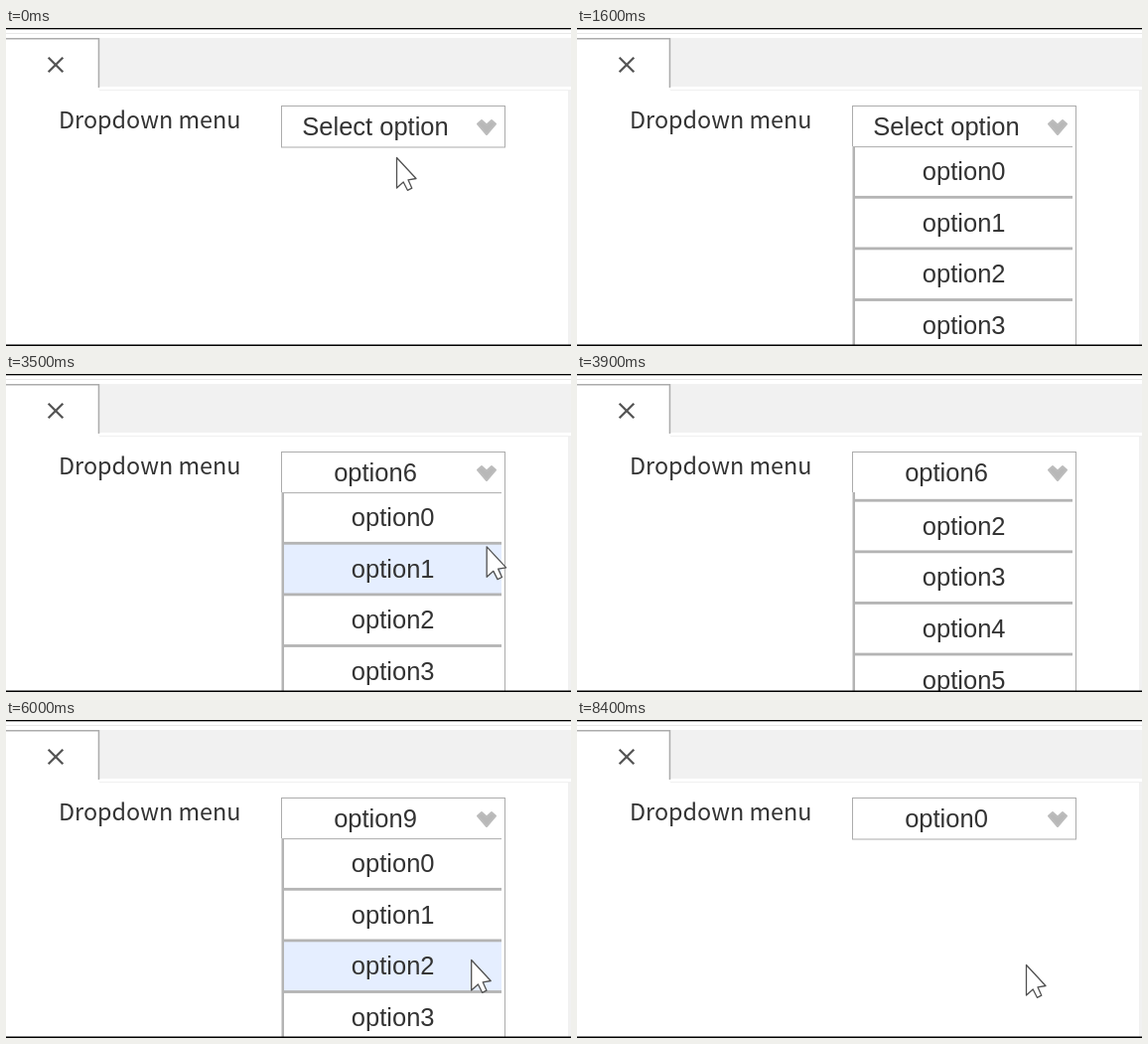
Recreate the animation shown at these times as an HTML page with a canvas. Size 569 px wide and 320 px high, loop 8.5 s.

```html
<!DOCTYPE html>
<html lang="en">
<head>
<meta charset="utf-8">
<title>Dropdown menu</title>
<style>
  html, body { margin: 0; width: 100%; height: 100%; overflow: hidden; background: #fff; }
  canvas { display: block; width: 569px; height: 320px; }
</style>
</head>
<body>
<canvas id="stage"></canvas>
<script>
const W = 569, H = 320, LOOP = 8500, STEP = 100;
const canvas = document.getElementById('stage');
const ctx = canvas.getContext('2d');
const ratio = window.devicePixelRatio || 1;
canvas.width = Math.round(W * ratio);
canvas.height = Math.round(H * ratio);

const BLUE = '#e5eeff', PRESSED = '#d9d9d9', RULE = '#b4b4b4', EDGE = '#acacac', INK = '#333';
const BOX = { x: 277, y: 78, w: 226, h: 42 };
const LIST = { x: 279, y: 119, w: 220, first: 118.7, pitch: 51.6, count: 10 };
const OPTION_FONT = '25.5px "Liberation Sans", Arial, sans-serif';
const LABEL_FONT = '23.4px "Noto Sans CJK JP", "Noto Sans CJK SC", "Noto Sans", sans-serif';

// Each visit: go home to the box, open, leave towards an option, pick it.
const VISITS = [
  { home: [431, 103], open: 900, leave: 1200, gone: 1600, exit: [443, 340], pick: 2600, choice: 'option6' },
  { home: [482, 90], open: 3400, leave: 3400, gone: 3700, exit: [487, 340], pick: 4200, choice: 'option9', scroll: 142 },
  { home: [482, 82], open: 5400, leave: 5400, gone: 6400, exit: [459, 347], pick: 6600, choice: 'option4' },
  { home: [432, 103], open: 7000, leave: 7300, gone: 7700, exit: [435, 146], pick: 7800, choice: 'option0' }
];
const START = [393, 130], REST = [452, 246];
const RETURN_TIME = 500, PRESS_TIME = 200, SCROLL_TIME = 300;

const progress = (t, from, to) => Math.min(1, Math.max(0, (t - from) / (to - from)));
const easeOut = p => 1 - (1 - p) ** 2;
const mix = (a, b, p) => a.map((v, i) => v + (b[i] - v) * p);

function pointerAt(t) {
  const goBack = (from, to, since) => mix(from, to, easeOut(progress(t, since, since + RETURN_TIME)));
  let from = START, since = 0;
  for (const v of VISITS) {
    if (t < v.leave) return goBack(from, v.home, since);
    if (t < v.pick) return mix(v.home, v.exit, progress(t, v.leave, v.gone));
    from = v.exit;
    since = v.pick;
  }
  return goBack(from, REST, since);
}

function menuAt(t) {
  const done = VISITS.filter(v => v.pick <= t).length;
  const label = done ? VISITS[done - 1].choice : 'Select option';
  const visit = VISITS[done];
  if (!visit) return { label, open: false, pressed: false };
  return {
    label,
    open: t >= visit.open,
    pressed: t >= visit.open - PRESS_TIME,
    scroll: (visit.scroll || 0) * progress(t, visit.gone, visit.gone + SCROLL_TIME)
  };
}

function rect(x, y, w, h, color) {
  ctx.fillStyle = color;
  ctx.fillRect(x, y, w, h);
}

function shape(points, x, y, fill, line, width) {
  ctx.beginPath();
  for (const [px, py] of points) ctx.lineTo(x + px, y + py);
  ctx.closePath();
  ctx.fillStyle = fill;
  ctx.fill();
  ctx.strokeStyle = line;
  ctx.lineWidth = width;
  ctx.lineJoin = 'round';
  ctx.stroke();
}

function text(str, x, y, font, align) {
  ctx.font = font;
  ctx.textAlign = align;
  ctx.fillStyle = INK;
  ctx.fillText(str, x, y);
}

function drawPage() {
  rect(0, 0, W, H, '#fff');
  rect(0, 5, W, 1, '#e8e8e8');
  rect(94, 10, W - 94, 49, '#f1f1f1');
  rect(94, 62, W - 94, 1, '#f0f0f0');
  rect(566, 62, 3, H - 62, '#f1f1f1');
  rect(0, 10, 94, 1.5, EDGE);
  rect(92.7, 10, 1.5, 50, EDGE);
  ctx.strokeStyle = '#555';
  ctx.lineWidth = 2.3;
  ctx.beginPath();
  for (const side of [-7.3, 7.3]) {
    ctx.moveTo(50 - side, 29.7);
    ctx.lineTo(50 + side, 44.3);
  }
  ctx.stroke();
  text('Dropdown menu', 53, 101, LABEL_FONT, 'left');
}

function drawHeader(label, fill) {
  rect(BOX.x, BOX.y, BOX.w, BOX.h + 0.5, EDGE);
  rect(BOX.x + 1, BOX.y + 1, BOX.w - 2, BOX.h - 1.5, fill);
  text(label, 372, 108.2, OPTION_FONT, 'center');
  shape([[-9, -3.5], [-5, -7], [0, -2.5], [5, -7], [9, -3.5], [0, 7]], 484, 100, '#b8b8b8', '#bcbcbc', 2);
}

function drawList(scroll, [px, py]) {
  ctx.save();
  ctx.beginPath();
  ctx.rect(BOX.x, LIST.y, BOX.w, H);
  ctx.clip();
  rect(BOX.x, LIST.y, BOX.w, H, '#fff');
  for (let i = 0; i < LIST.count; i++) {
    const y = LIST.first + i * LIST.pitch - scroll;
    const hover = py > LIST.y && py >= y && py < y + LIST.pitch;
    if (hover) rect(LIST.x, y, LIST.w, LIST.pitch, BLUE);
    rect(LIST.x, y - 1.4, LIST.w, 2.8, RULE);
    text('option' + i, 389.7, y + 34.5, OPTION_FONT, 'center');
  }
  rect(277.5, LIST.y, 2.5, H, RULE);
  rect(502, LIST.y, 1, H, EDGE);
  ctx.restore();
}

function drawPointer([x, y]) {
  const arrow = [[0.5, 0.5], [0.5, 31], [7.2, 25], [11.4, 33.3], [15.8, 31.2], [12, 22.8], [20, 21.5]];
  shape(arrow, x, y, '#fff', '#505050', 1.3);
}

function draw(t) {
  const menu = menuAt(t), pointer = pointerAt(t), [x, y] = pointer;
  const over = x > BOX.x && x < BOX.x + BOX.w && y > BOX.y && y < BOX.y + BOX.h;
  const closedFill = menu.pressed ? PRESSED : over ? BLUE : '#fff';
  ctx.setTransform(ratio, 0, 0, ratio, 0, 0);
  drawPage();
  drawHeader(menu.label, menu.open ? '#fff' : closedFill);
  if (menu.open) drawList(menu.scroll, pointer);
  drawPointer(pointer);
  rect(0, 0, W, 1.3, '#000');
  rect(0, 318.5, W, 1.5, '#000');
}

const start = performance.now();
function frame() {
  const t = (performance.now() - start) % LOOP;
  draw(Math.floor(t / STEP) * STEP);
  requestAnimationFrame(frame);
}
frame();
</script>
</body>
</html>
```
